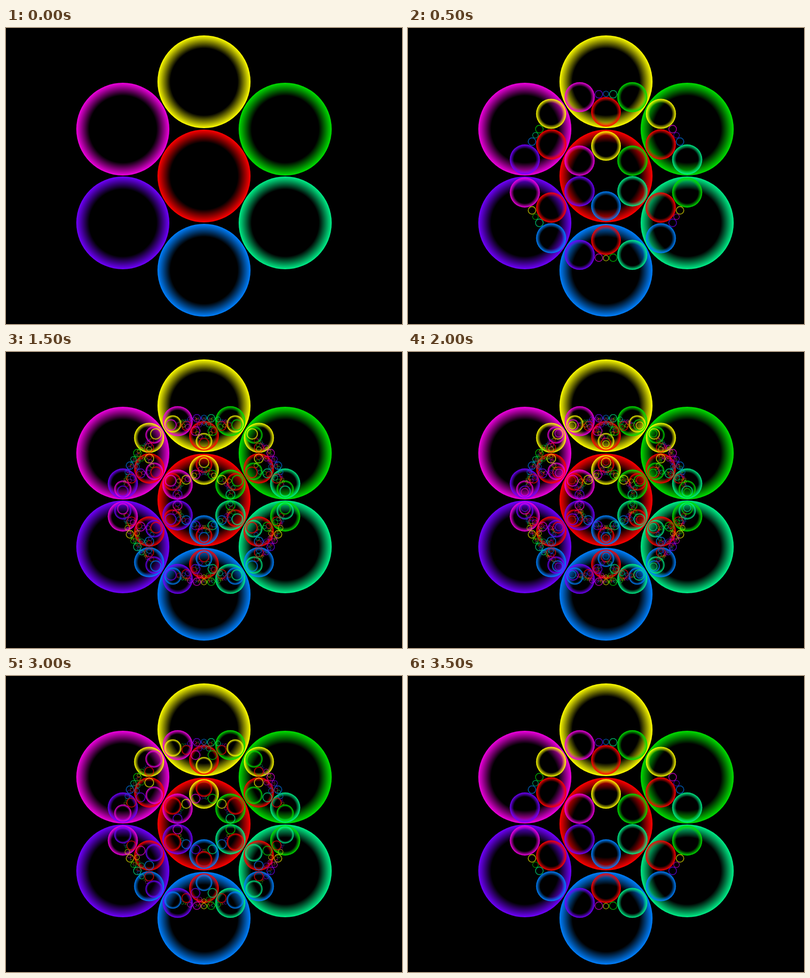
An HTML page with a canvas that plays this animation: 800x600 px, repeating every 4 s.

```html
<!DOCTYPE html>
<html lang="en">
<head>
<meta charset="utf-8">
<title>Circle inversions</title>
<style>
  html, body { margin: 0; width: 100%; height: 100%; overflow: hidden; background: #000; }
  canvas { position: absolute; left: 0; top: 0; animation: 4s step-end infinite; }
  .depth2 { animation-name: depth2; }
  .depth3 { animation-name: depth3; }
  .depth4 { animation-name: depth4; }
  .depth5 { animation-name: depth5; }
  @keyframes depth2 { 0% { opacity: 0 } 12.5%, 100% { opacity: 1 } }
  @keyframes depth3 { 0%, 87.5%, 100% { opacity: 0 } 25% { opacity: 1 } }
  @keyframes depth4 { 0%, 75%, 100% { opacity: 0 } 37.5% { opacity: 1 } }
  @keyframes depth5 { 0%, 62.5%, 100% { opacity: 0 } 50% { opacity: 1 } }
</style>
</head>
<body>
<script>
const R = 94, DEPTH = 5, MIN_R = 0.4;
const RIM = 0.72; // where the glow starts, as a share of the radius

const seeds = [
  { x: 400, y: 300, rgb: '255,0,0' },
  { x: 400, y: 109, rgb: '255,255,0' },
  { x: 564, y: 205, rgb: '0,224,0' },
  { x: 564, y: 395, rgb: '0,240,136' },
  { x: 400, y: 491, rgb: '0,128,255' },
  { x: 236, y: 395, rgb: '112,0,255' },
  { x: 236, y: 205, rgb: '240,0,224' }
].map((s, i) => ({ ...s, r: R, home: i }));

// Mirror circle c in the seed circle with index i.
function invert(c, i) {
  const s = seeds[i], dx = c.x - s.x, dy = c.y - s.y;
  const k = R * R / (dx * dx + dy * dy - c.r * c.r);
  return { x: s.x + dx * k, y: s.y + dy * k, r: c.r * k, rgb: c.rgb, home: i };
}

function drawRing(ctx, { x, y, r, rgb }) {
  const glow = ctx.createRadialGradient(x, y, r * RIM, x, y, r);
  glow.addColorStop(0, `rgba(${rgb},0)`);
  glow.addColorStop(1, `rgb(${rgb})`);
  ctx.fillStyle = glow;
  ctx.beginPath();
  ctx.arc(x, y, r, 0, 2 * Math.PI);
  ctx.fill();
}

let circles = seeds;
for (let depth = 1; depth <= DEPTH; depth++) {
  const layer = document.createElement('canvas');
  layer.width = 800;
  layer.height = 600;
  layer.className = 'depth' + depth;
  document.body.append(layer);
  const ctx = layer.getContext('2d');
  circles.filter(c => c.r > MIN_R).forEach(c => drawRing(ctx, c));
  circles = circles.flatMap(c =>
    seeds.filter(s => s.home !== c.home).map(s => invert(c, s.home)));
}
</script>
</body>
</html>
```
